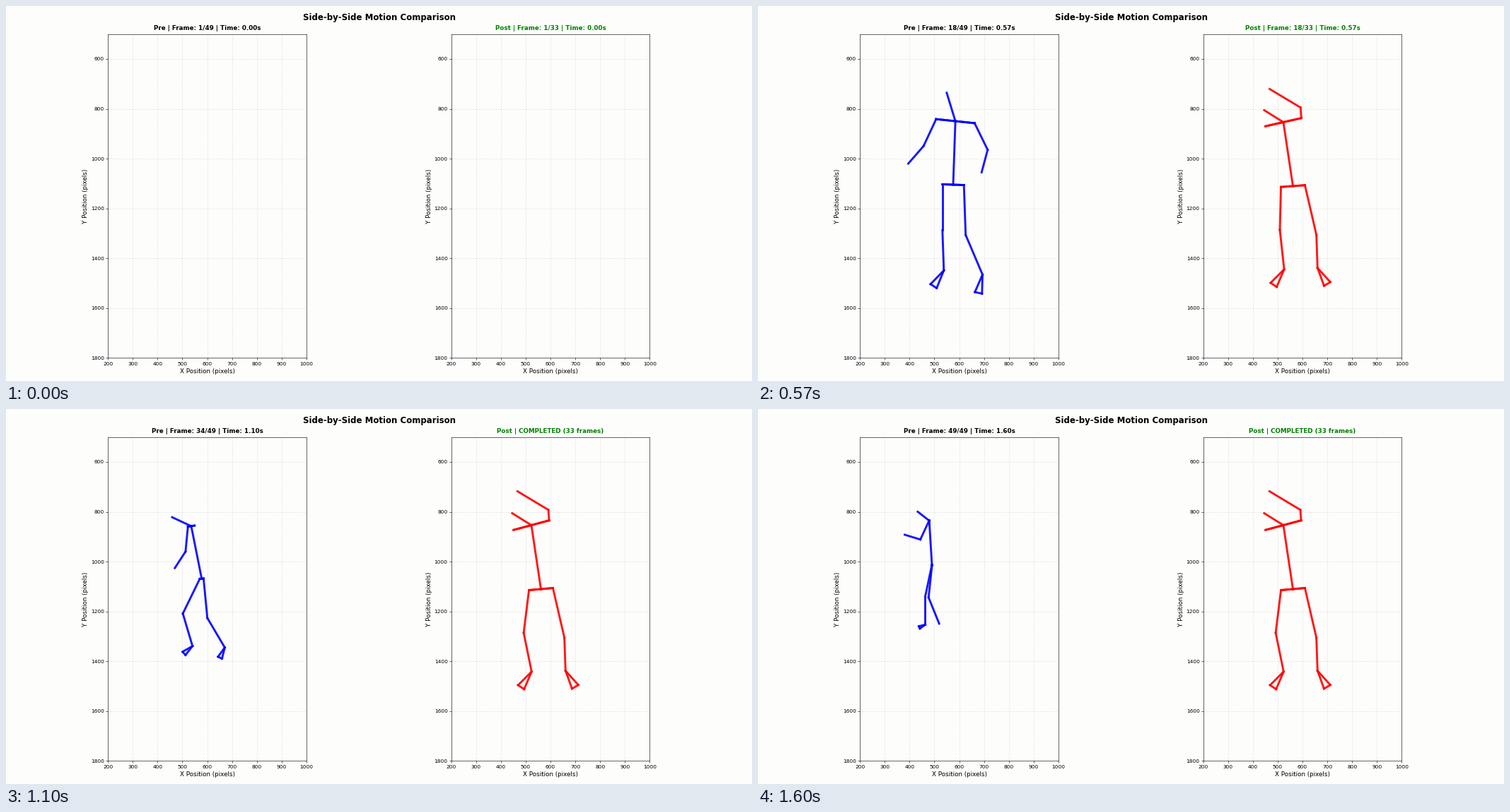
A matplotlib script that plays this animation: 1055x531 px, repeating every 1.63 s.

```python
import numpy as np
import matplotlib.pyplot as plt
from matplotlib.animation import FuncAnimation
from matplotlib.collections import LineCollection

W, H, DPI = 1055, 531, 52.75
TICK_MS, TICKS = 10, 163
FPS = 30
PRE_COUNT, POST_COUNT = 49, 33


def ramp(step, start, end, a=0.0, b=1.0):
    """Ease smoothly from a to b between two steps."""
    t = np.clip((step - start) / (end - start), 0, 1)
    return a + (b - a) * t * t * (3 - 2 * t)


def track(step, *values):
    """Follow the key values of one joint of the runner."""
    return np.interp(step, (11, 17, 23, 29, 37, 48), values)


def polar(start, length, angle):
    """Angles run in degrees from straight down towards the right."""
    a = np.radians(angle)
    return start[0] + length * np.sin(a), start[1] + length * np.cos(a)


def links(points):
    return list(zip(points, points[1:]))


def chain(start, bones):
    points = [start]
    for length, angle in bones:
        points.append(polar(points[-1], length, angle))
    return points


def foot(ankle, length, angle, spread=11):
    heel = polar(ankle, length, angle - spread)
    toe = polar(ankle, length, angle + spread)
    return links([ankle, heel, toe, ankle])


def body(pelvis, torso, lean, head, nod, shoulder, hip, tilt, arms, legs, feet):
    """Segments of a stick figure; arms, legs and feet are (left, right)."""
    neck = polar(pelvis, torso, 180 - lean)
    nose = polar(neck, head, 180 - nod)
    shoulders = [polar(neck, side * shoulder, 90 - tilt) for side in (-1, 1)]
    hips = [polar(pelvis, side * hip, 90 - tilt / 3) for side in (-1, 1)]
    segments = [(nose, neck), (neck, pelvis)]
    for centre, (left, right) in ((neck, shoulders), (pelvis, hips)):
        segments += [(centre, left), (centre, right), (left, right)]
    for start, bones in zip(shoulders, arms):
        segments += links(chain(start, bones))
    for start, bones, sole in zip(hips, legs, feet):
        leg = chain(start, bones)
        segments += links(leg) + foot(leg[-1], *sole)
    return segments


def runner(step):
    """Turns side-on and runs off, getting smaller with distance."""
    size = ramp(step, 17, 48, 1, 0.7)
    turn = np.exp(-(max(step - 11, 0) / 16) ** 2)
    reach = size * (1 + 0.15 * np.sin(np.pi * ramp(step, 11, 35)))
    upper, fore, sole = 42 * size, 33 * size, 27 * size ** 3

    arm_l = [(upper, track(step, -6, -25, 0, -37, 26, -25))]
    arm_r = [(upper, track(step, -11, 26, 2, 2, 2, 2))]
    if step >= 14:
        arm_l.append((fore, track(step, -41, -41, -29, -54, -12, -107)))
        arm_r.append((fore, track(step, -15, -15, -29, -29, -29, -29)))
    if step >= 26:
        arm_r = []
    leg_l = [(65 * size, track(step, 1, 0, -27, -27, -25, -12)),
             (57 * size, track(step, 0, 2, 34, 43, -10, 0))]
    leg_r = [(66 * reach, track(step, 7, 2, -2, 3, 8, -6)),
             (57 * reach, track(step, 2, 23, 30, 30, 31, 22))]
    foot_l = sole, ramp(step, 29, 37, -33, -65)
    foot_r = (sole * (step < 43),
              ramp(step, 11, 23, 15, -40) + ramp(step, 29, 37, 0, 30))
    pelvis = (track(step, 273, 275.5, 287, 288, 264.5, 245.5),
              track(step, 250, 252.5, 267, 250, 229.5, 220.5))
    return body(pelvis, 90 * size, track(step, 3, 2, -1, -7.5, -15, -3.5),
                42 * size ** 2, track(step, 13, -17, -48, -63, -67, -52),
                31.5 * turn, 17.5 * turn, ramp(step, 23, 29, 6, -10),
                (arm_l, arm_r), (leg_l, leg_r), (foot_l, foot_r))


def thrower(step):
    """Swings the right arm overhead, then holds the pose."""
    swing, settle = ramp(step, 11, 17), ramp(step, 11, 24)
    arm_l = [(45, 2)] if step < 14 else []
    arm_r = [(40 - 25 * swing, 34 + 150 * swing),
             (44 + 7 * swing, 37 + 202 * swing)]
    leg_l = [(61, 3 - 10 * settle), (56, 2 + 9.5 * settle)]
    leg_r = [(67 + 5 * swing, 13), (55 - 8 * swing, 6 - 4 * swing)]
    return body((756, 254.5), 94 - 2.5 * swing, -2 - 6.5 * swing,
                34 - 2 * swing, -38 - 20 * swing,
                29 - 3 * swing, 17, -11 - 4 * settle,
                (arm_l, arm_r), (leg_l, leg_r), ((27, -34), (27, 31)))


plt.rcParams["font.family"] = "DejaVu Sans"
fig = plt.figure(figsize=((W + 1e-6) / DPI, (H + 1e-6) / DPI), dpi=DPI,
                 facecolor="#fdfdfc")
fig.suptitle("Side-by-Side Motion Comparison", y=0.982,
             fontsize=16, fontweight="bold")


def add_panel(left, title_color):
    ax = fig.add_axes([left / W, 1 - 498.4 / H, 280.7 / W, 458.7 / H],
                      facecolor="none")
    ax.set(xlim=(200, 1000), ylim=(1800, 500),
           xticks=range(200, 1001, 100), yticks=range(600, 1801, 200))
    ax.set_xlabel("X Position (pixels)", fontsize=12, labelpad=5)
    ax.set_ylabel("Y Position (pixels)", fontsize=12)
    ax.grid(True, alpha=0.4, linestyle="--")
    return ax.set_title("", fontsize=12, fontweight="bold",
                        color=title_color, pad=7.3)


def add_skeleton(color):
    lines = LineCollection([], colors=color, linewidths=4, alpha=0.9,
                           capstyle="projecting")
    stage.add_collection(lines, autolim=False)
    return lines


pre_title = add_panel(144.2, "black")
post_title = add_panel(629.7, "green")
# Whole coordinates fall on pixel centres.
stage = fig.add_axes([0, 0, 1, 1], xlim=(-0.5, W - 0.5), ylim=(H - 0.5, -0.5))
stage.axis("off")
pre_lines = add_skeleton("blue")
post_lines = add_skeleton("red")


def caption(name, step, count):
    if step >= count:
        return f"{name} | COMPLETED ({count} frames)"
    return f"{name} | Frame: {step + 1}/{count} | Time: {step / FPS:.2f}s"


def update(tick):
    # Video steps last 1/30 s, rounded to whole ticks.
    step = (3 * tick + 1) // 10
    pre_title.set_text(caption("Pre", step, PRE_COUNT))
    post_title.set_text(caption("Post", step, POST_COUNT))
    pre_lines.set_segments(runner(step) if step else [])
    post_lines.set_segments(thrower(step) if step else [])
    return pre_title, post_title, pre_lines, post_lines


anim = FuncAnimation(fig, update, frames=TICKS, interval=TICK_MS,
                     init_func=lambda: update(0), repeat=True, repeat_delay=0)
plt.show()
```
